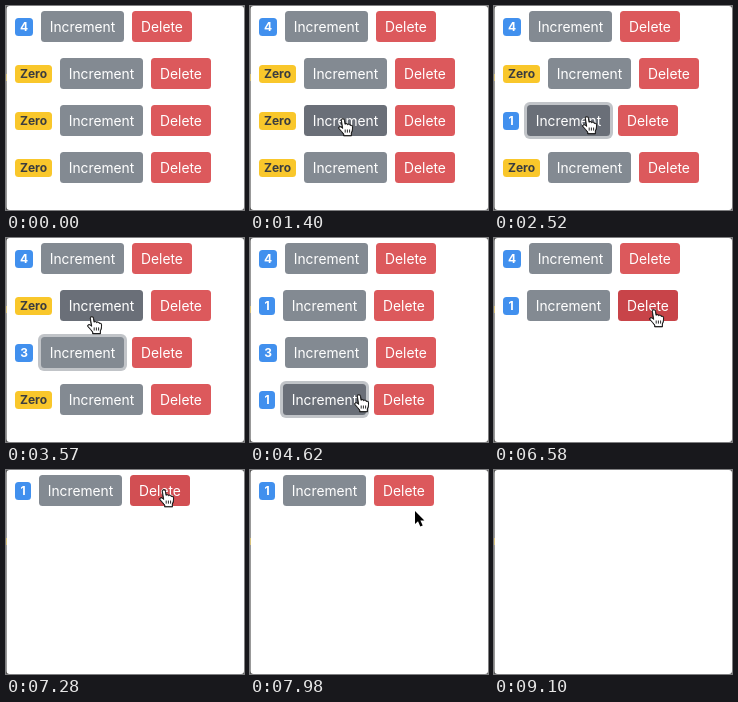
An HTML page with a canvas that plays this animation: 238x204 px, repeating every 9590 ms.

```html
<!DOCTYPE html>
<html lang="en">
<head>
<meta charset="utf-8">
<title>Counters</title>
<style>
html, body { margin: 0; width: 238px; height: 204px; overflow: hidden; background: #fff; }
canvas { display: block; width: 238px; height: 204px; }
</style>
</head>
<body>
<canvas id="stage"></canvas>
<script>
const W = 238, H = 204, LOOP = 9590, STEP = 70, FADE = 150;
const canvas = document.getElementById('stage');
const ctx = canvas.getContext('2d');
const dpr = window.devicePixelRatio || 1;
canvas.width = W * dpr;
canvas.height = H * dpr;

const FONT = 'Inter, Roboto, sans-serif';
const GREY = [131, 138, 146], GREY_DARK = [106, 111, 120];
const RED = [220, 89, 92], RED_DARK = [200, 68, 73];

// pointer path: time, x, y
const PATH = [
  [770, 108, 172], [1050, 100, 152], [1400, 93, 113], [2450, 93, 113],
  [2520, 93, 111], [3220, 92, 111], [3500, 86, 79], [3920, 86, 78],
  [4270, 98, 169], [4410, 100, 168], [4620, 109, 157], [4690, 111, 157],
  [4970, 160, 164], [5180, 160, 164], [5390, 196, 148], [5670, 165, 114],
  [6090, 165, 112], [6440, 160, 72], [6650, 160, 72], [6860, 158, 21],
  [7350, 158, 20], [7910, 165, 41], [8010, 165, 41], [8260, 149, 18],
  [8540, 146, 15], [8680, 146, 15], [9100, 149, 210]
];

// presses: time, row id, action
const CLICKS = [
  [1750, 2, 'inc'], [2870, 2, 'inc'], [3080, 2, 'inc'],
  [3780, 1, 'inc'], [4410, 3, 'inc'],
  [5110, 3, 'del'], [5950, 2, 'del'], [7140, 0, 'del'], [8330, 1, 'del']
];
const HOLD = 70;

function pointer(t) {
  if (t < PATH[0][0] || t >= 9100) return null;
  const i = PATH.findIndex(p => p[0] > t);
  const [t0, x0, y0] = PATH[i - 1], [t1, x1, y1] = PATH[i];
  const u = (t - t0) / (t1 - t0), e = u * u * (3 - 2 * u);
  return { x: x0 + (x1 - x0) * e, y: y0 + (y1 - y0) * e };
}

function rowsAt(t) {
  let rows = [4, 0, 0, 0].map((count, id) => ({ id, count }));
  for (const [at, id, action] of CLICKS) {
    if (t < at + HOLD) break;
    if (action === 'del') rows = rows.filter(r => r.id !== id);
    else rows.find(r => r.id === id).count++;
  }
  rows.forEach((r, i) => {
    r.y = 5 + 47 * i;
    r.badge = r.count === 0 ? 37 : r.count === 1 ? 16 : 18;
    r.inc = 9 + r.badge + 8;
    r.del = r.inc + 91;
  });
  return rows;
}

function hoverAt(t) {
  const p = pointer(t);
  if (!p) return '';
  for (const r of rowsAt(t)) {
    if (p.y < r.y || p.y > r.y + 31) continue;
    if (p.x >= r.inc && p.x <= r.inc + 83) return r.id + 'inc';
    if (p.x >= r.del && p.x <= r.del + 60) return r.id + 'del';
  }
  return '';
}

function focusAt(t) {
  const last = CLICKS.filter(c => c[0] <= t).pop();
  return last ? last[1] + last[2] : '';
}

// averaging the recent past gives a linear fade
function faded(test, key, t) {
  const n = 8;
  let sum = 0;
  for (let k = 0; k < n; k++) if (test(t - k * FADE / n) === key) sum++;
  return sum / n;
}

const mix = (a, b, u) => `rgb(${a.map((v, i) => Math.round(v + (b[i] - v) * u))})`;

function box(x, y, w, h, r, fill) {
  ctx.fillStyle = fill;
  ctx.beginPath();
  ctx.roundRect(x, y, w, h, r);
  ctx.fill();
}

function label(text, x, y, font, fill) {
  ctx.font = `${font} ${FONT}`;
  ctx.fillStyle = fill;
  ctx.fillText(text, x, y);
}

function button(text, key, x, y, w, base, dark, t) {
  const ring = faded(focusAt, key, t);
  if (ring) box(x - 3, y - 3, w + 6, 37, 6, `rgba(${base},${0.5 * ring})`);
  box(x, y, w, 31, 3.5, mix(base, dark, faded(hoverAt, key, t)));
  label(text, x + w / 2, y + 21, '400 13.8px', '#fff');
}

function drawRow(r, t) {
  const zero = r.count === 0;
  box(9, r.y + 7, r.badge, 18, 3.5, zero ? '#f9c72b' : '#4190ee');
  label(zero ? 'Zero' : r.count, 9 + r.badge / 2, r.y + 20.3, '700 12px', zero ? '#3b3d3f' : '#fff');
  button('Increment', r.id + 'inc', r.inc, r.y, 83, GREY, GREY_DARK, t);
  button('Delete', r.id + 'del', r.del, r.y, 60, RED, RED_DARK, t);
}

const ARROW = new Path2D('M0 0V13L3 10.2L5.3 15.6L7.7 14.6L5.4 9.4H9.4Z');
const HAND = new Path2D('M-1.6 1.2C-1.6 -.6 1.2 -.6 1.4 1.2L2 5.4C2.6 4.3 4.3 4.5 4.6 5.8' +
  'C5.4 4.9 6.9 5.3 7.2 6.5C8.2 6 9.4 6.7 9.5 8C9.7 11 8.8 12.5 8.3 14V16.6H.8V15' +
  'C-.7 13.2 -2.1 11.5 -3.8 9.7C-4.7 8.4 -3.1 7.2 -1.8 8.2L-.3 9.4Z');
const CREASES = new Path2D('M2.2 10.5V13.6M4.4 10.5V13.6M6.6 10.5V13.6');

function drawPointer(t) {
  const p = pointer(t);
  if (!p) return;
  const hand = hoverAt(t) !== '';
  const shape = hand ? HAND : ARROW;
  ctx.save();
  ctx.translate(p.x, p.y);
  ctx.lineJoin = 'round';
  ctx.lineWidth = hand ? 1.2 : 1.6;
  ctx.strokeStyle = hand ? '#111' : '#fff';
  ctx.fillStyle = hand ? '#fff' : '#000';
  ctx.stroke(shape);
  ctx.fill(shape);
  if (hand) {
    ctx.lineWidth = 0.9;
    ctx.stroke(shape);
    ctx.stroke(CREASES);
  }
  ctx.restore();
}

function drawWindow() {
  ctx.fillStyle = '#555';
  ctx.fillRect(0, 0, W, H);
  box(0.6, 0, W - 0.6, H, 3, '#fff');
  ctx.fillStyle = '#d8c27a';
  ctx.fillRect(0, 68, 1, 7);
}

function frame(now) {
  const t = Math.floor((now % LOOP) / STEP) * STEP;
  ctx.setTransform(dpr, 0, 0, dpr, 0, 0);
  ctx.textAlign = 'center';
  drawWindow();
  rowsAt(t).forEach(r => drawRow(r, t));
  drawPointer(t);
}

const start = performance.now();
function tick() {
  frame(performance.now() - start);
  requestAnimationFrame(tick);
}
tick();
</script>
</body>
</html>
```
